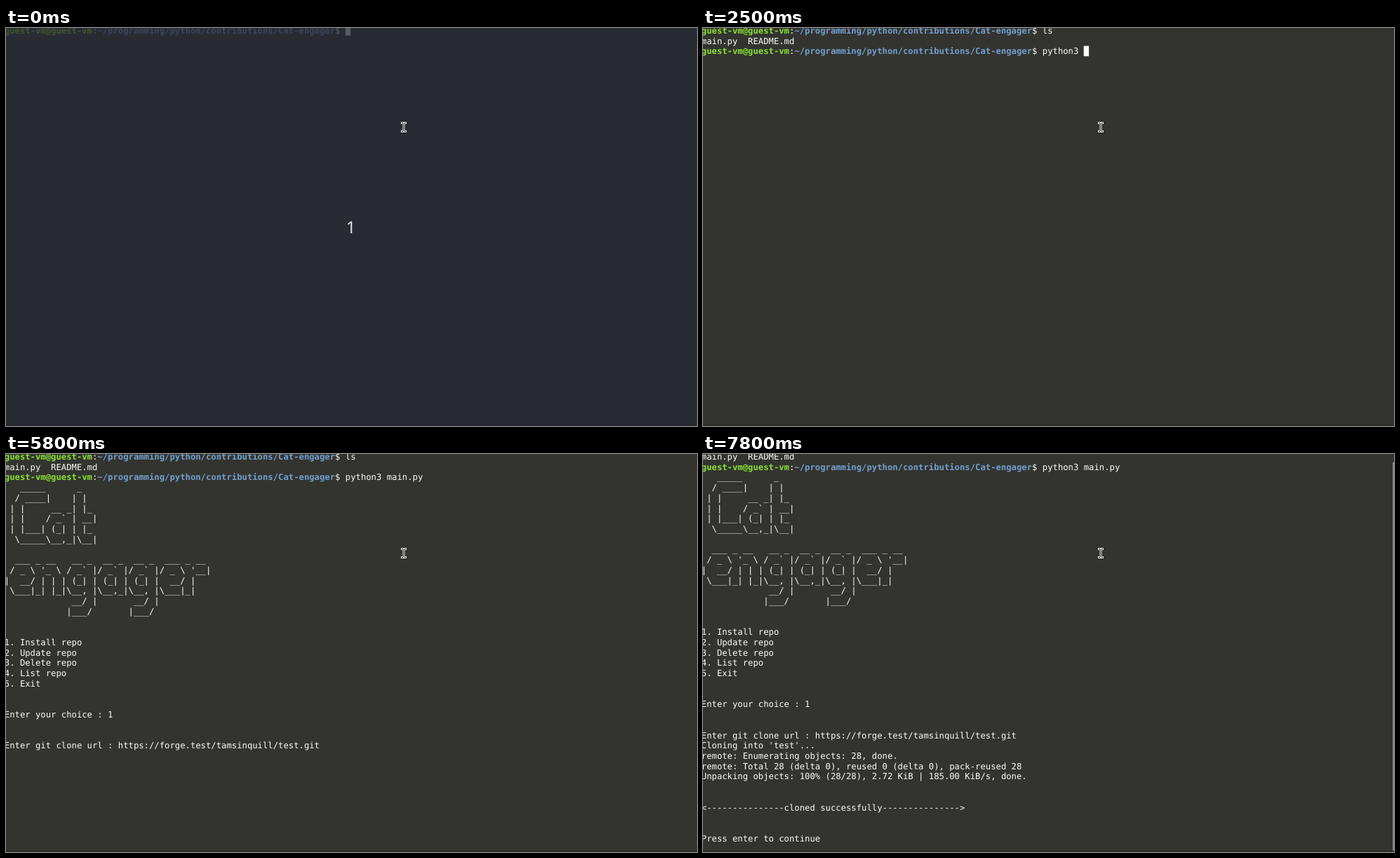
Write an HTML page with a canvas that moves like this. It is 985x568 px and loops after 8000 ms.

```html
<!DOCTYPE html>
<html lang="en">
<head>
<meta charset="utf-8">
<title>Terminal session</title>
<style>
html, body { margin: 0; height: 100%; overflow: hidden; background: #33342f; }
canvas { display: block; }
</style>
</head>
<body>
<canvas width="985" height="568"></canvas>
<script type="text/plain" id="menu">
   _____      _
  / ____|    | |
 | |     __ _| |_
 | |    / _` | __|
 | |___| (_| | |_
  \_____\__,_|\__|

  ___ _ __   __ _  __ _  __ _  ___ _ __
 / _ \ '_ \ / _` |/ _` |/ _` |/ _ \ '__|
|  __/ | | | (_| | (_| | (_| |  __/ |
 \___|_| |_|\__, |\__,_|\__, |\___|_|
             __/ |       __/ |
            |___/       |___/


1. Install repo
2. Update repo
3. Delete repo
4. List repo
5. Exit


</script>
<script type="text/plain" id="report">
remote: Enumerating objects: 28, done.
remote: Total 28 (delta 0), reused 0 (delta 0), pack-reused 28
Unpacking objects: 100% (28/28), 2.72 KiB | 185.00 KiB/s, done.
</script>
<script>
const WIDTH = 985, HEIGHT = 568, LOOP = 8000, VISIBLE_ROWS = 38;
const CELL_W = 81 / 11, CELL_H = 162 / 11, LEFT = -2.2, TOP = -3.9;
const BG = '#33342f', FG = '#fcfcf9', GREEN = '#8ae234', BLUE = '#729fcf';
const MONO = '12.23px "DejaVu Sans Mono", monospace';
const USER = 'guest-vm@guest-vm', PATH = '~/programming/python/contributions/Cat-engager';
const PROMPT = `${USER}:${PATH}$ `;
const DASHES = '-'.repeat(15);

const ctx = document.querySelector('canvas').getContext('2d');
const block = id => document.getElementById(id).textContent.slice(1);

// Each event appends text; the cursor sits at the end of it.
const events = [];
let screen = '';
function print(time, text, cursor = true) {
  screen += text;
  events.push({ time, lines: screen.split('\n'), cursor });
}
const hideCursor = time => print(time, '', false);
const showCursor = time => print(time, '');

print(0, PROMPT);
print(500, 'ls');
print(1000, '\nmain.py  README.md\n' + PROMPT);
hideCursor(1300);
showCursor(1400);
print(1600, 'p');
print(1700, 'y');
print(1800, 'th');
print(2000, 'on');
print(2300, '3');
print(2500, ' ');
print(3000, 'main.py ');
print(3300, '\n');
print(3500, block('menu') + 'Enter your choice : ');
hideCursor(4000);
print(4400, '1');
print(4500, '\n');
print(4600, '\n\nEnter git clone url : ');
print(5800, 'https://forge.test/tamsinquill/test.git', false);
print(6100, "\nCloning into 'test'...\n");
hideCursor(6600);
print(7000, block('report'), false);
print(7100, `\n\n<${DASHES}cloned successfully${DASHES}>\n\n\nPress enter to continue`);
hideCursor(7800);

function rect(color, x, y, w, h) {
  ctx.fillStyle = color;
  ctx.fillRect(x, y, w, h);
}

// Sets text on the character grid and returns the next column.
function write(text, col, y, color = FG, weight = '') {
  ctx.font = `${weight} ${MONO}`;
  ctx.fillStyle = color;
  for (const char of text) ctx.fillText(char, LEFT + col++ * CELL_W, y + 11.8);
  return col;
}

function drawLine(text, y) {
  if (!text.startsWith(PROMPT)) return write(text, 0, y);
  let col = write(USER, 0, y, GREEN, 'bold');
  col = write(':', col, y);
  col = write(PATH, col, y, BLUE, 'bold');
  write('$ ' + text.slice(PROMPT.length), col, y);
}

function drawPointer(x, y) {
  for (const [color, grow] of [['#e8e8e8', 1], ['#151515', 0]]) {
    const bar = (dx, dy, w, h) =>
      rect(color, x + dx - grow, y + dy - grow, w + 2 * grow, h + 2 * grow);
    bar(-0.5, -5, 1, 11);
    for (const end of [-6, 6]) {
      bar(-3, end, 2, 1);
      bar(1, end, 2, 1);
    }
  }
}

function drawCountdown() {
  rect('rgba(38,41,52,.75)', 0, 0, WIDTH, HEIGHT);
  ctx.font = '24px "Noto Sans", sans-serif';
  ctx.fillStyle = '#dedede';
  ctx.textAlign = 'center';
  ctx.fillText('1', WIDTH / 2 - 1, 293);
  ctx.textAlign = 'left';
}

function draw(t) {
  const { lines, cursor } = events.findLast(event => event.time <= t);
  const last = lines.length - 1;
  const scroll = Math.max(0, lines.length - VISIBLE_ROWS);
  const rowY = row => TOP + (row - scroll) * CELL_H;

  rect(BG, 0, 0, WIDTH, HEIGHT);
  lines.forEach((line, row) => drawLine(line, rowY(row)));
  if (cursor) rect(FG, LEFT + lines[last].length * CELL_W, rowY(last), CELL_W, CELL_H);
  rect('#2b2c28', 0, HEIGHT - 2, WIDTH, 2);
  if (t >= 7200) rect('#85867f', WIDTH - 2, 12, 2, HEIGHT - 14);
  if (t < 200) drawCountdown();
  drawPointer(567, 141);
}

ctx.textRendering = 'geometricPrecision';
const start = performance.now();
function tick() {
  draw((performance.now() - start) % LOOP);
  requestAnimationFrame(tick);
}
tick();
</script>
</body>
</html>
```
